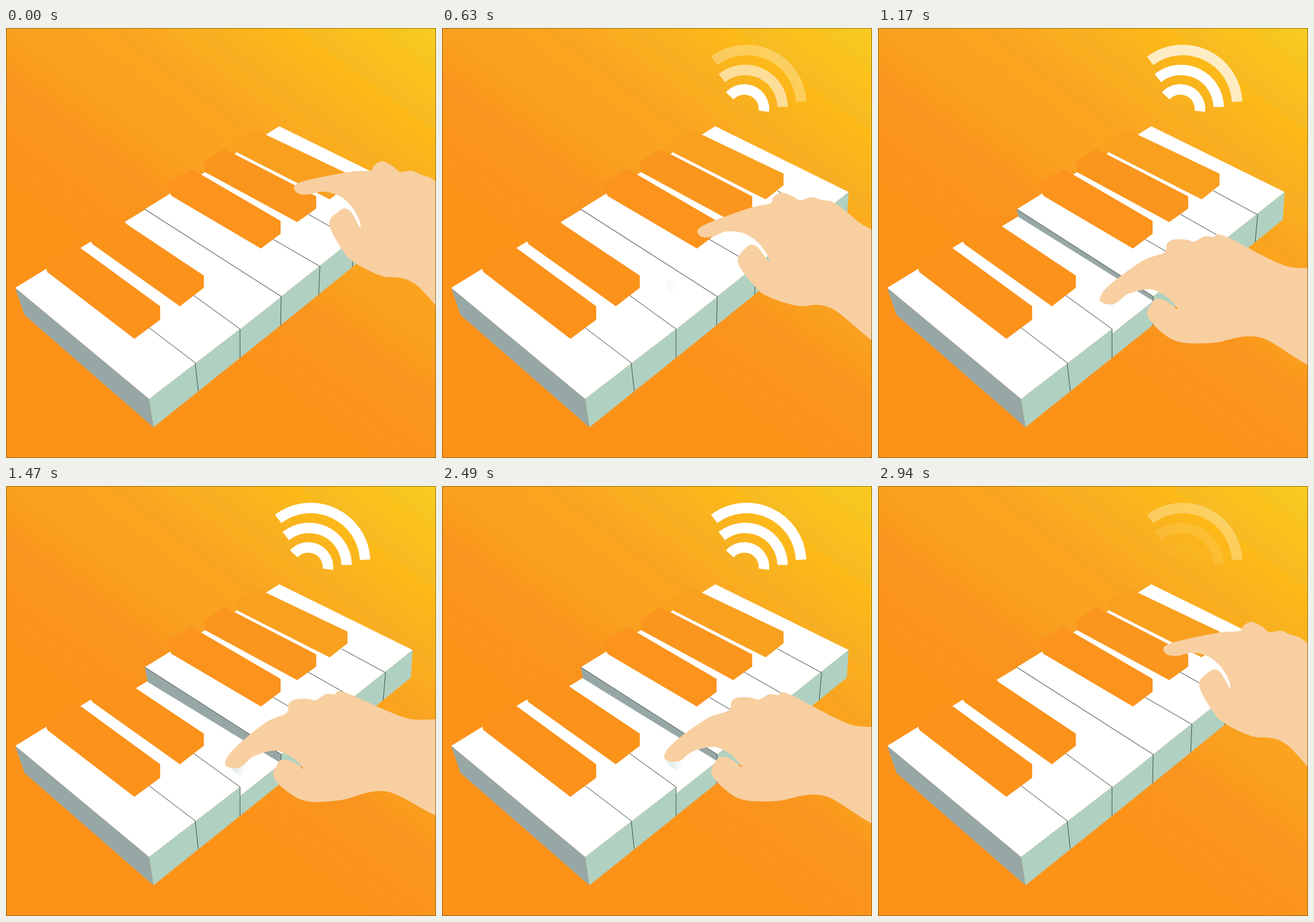
Animation, 700 px wide and 700 px high, one loop 3000 ms. Source, as an HTML page:

```html
<!DOCTYPE html>
<html lang="en">
<head>
<meta charset="utf-8">
<title>Piano key</title>
<style>
html, body { margin: 0; height: 100%; overflow: hidden; background: #fb9a1d; }
svg { display: block; width: 100%; height: 100%; }
.line { fill: none; stroke: #45544f; }
.top { fill: #fff; }
.front { fill: #b0d1c1; }
.side { fill: #97a7a6; }
.wave { fill: none; stroke: #fff; stroke-width: 17; opacity: 0; }
</style>
</head>
<body>
<svg viewBox="0 0 700 700">
  <defs>
    <linearGradient id="sky" gradientUnits="userSpaceOnUse" x1="-120" y1="160" x2="252" y2="-336">
      <stop offset="0" stop-color="#fd9219"/>
      <stop offset=".22" stop-color="#f9951f"/>
      <stop offset=".25" stop-color="#fb9a1d"/>
      <stop offset=".32" stop-color="#f9a020"/>
      <stop offset=".47" stop-color="#fca41e"/>
      <stop offset=".485" stop-color="#f8a321"/>
      <stop offset=".6" stop-color="#fcae1f"/>
      <stop offset=".613" stop-color="#f7ae22"/>
      <stop offset=".775" stop-color="#fdba17"/>
      <stop offset=".79" stop-color="#f6bb22"/>
      <stop offset=".895" stop-color="#fec31a"/>
      <stop offset=".91" stop-color="#f7c420"/>
      <stop offset="1" stop-color="#f9cb1f"/>
    </linearGradient>
    <linearGradient id="shade">
      <stop offset="0" stop-color="#dce8e1"/>
      <stop offset=".9" stop-color="#fff"/>
    </linearGradient>
  </defs>
  <rect width="700" height="700" fill="url(#sky)"/>

  <!-- the moving key and the wall beside it -->
  <path class="side" d="M226 295L448 437V454L231 322Z"/>
  <path class="front" id="keyFront"/>
  <path class="top" id="keyTop"/>
  <path id="shadow" fill="url(#shade)" d="M365 424Q367 413 381 416L396 420L384 444Q368 438 365 424Z"/>

  <path class="top" d="M15 423L190 316L200 350L305 435L381 490L233 604Z"/>
  <path class="top" d="M226 295L445 160L662 267L448 437Z"/>
  <path class="front" d="M233 604L381 490V537L240 650Z"/>
  <path class="front" d="M448 437L662 267L659 312L447 484Z"/>
  <path class="side" d="M15 423L233 604L240 650L30 467Z"/>
  <path class="line" d="M233 488L308 545L313 591M305 435L381 490V537M226 295L448 437L447 484"/>
  <path class="line" d="M435 344L511 388L509 434M492 303L566 345L564 389M546 265L618 304L614 349"/>

  <path fill="#fc921a" d="M64 385L115 350L121 358L251 453V475L209 506L67 397Z"/>
  <path fill="#fb931b" d="M138 347L165 308L180 307L193 317L322 403V423L283 453L141 352Z"/>
  <path fill="#fb931c" d="M263 251L303 230L447 314V335L415 359L269 273Z"/>
  <path fill="#fa961d" d="M323 217L356 197L505 274V294L474 316L323 234Z"/>
  <path fill="#f9a01f" d="M377 183L409 167L556 237V256L527 279L377 203Z"/>

  <path class="wave" d="M468.5 110.5A32 32 0 0 1 524 135.5"/>
  <path class="wave" d="M455.5 81.5A61 61 0 0 1 554.5 128.5"/>
  <path class="wave" d="M443 53.5A88.5 88.5 0 0 1 584.5 120"/>

  <path id="hand" fill="#f8cfa1"/>
  <rect x=".5" y=".5" width="699" height="699" fill="none" stroke="#6e5514" stroke-opacity=".7"/>
</svg>
<script>
const LOOP = 3000, STEP = 60;
const $ = id => document.getElementById(id);
const waves = document.querySelectorAll('.wave');

// Matching hand outlines as x, y pairs
const flat = [730,370, 670,317, 633,289, 612,284, 595,280, 577,285, 563,278, 545,273, 533,282, 528,291,
  495,299, 432,323, 411,336, 417,347, 434,347, 458,338, 485,340, 507,353, 523,372, 528,386,
  511,365, 500,359, 490,364, 477,388, 506,427, 528,443, 575,457, 630,460, 730,522];
const curled = [740,391, 650,376, 550,336, 532,339, 518,339, 502,349, 490,347, 470,348, 458,355, 454,371,
  420,387, 370,430, 356,453, 364,461, 382,459, 402,442, 436,432, 462,441, 477,453, 483,461,
  464,449, 448,447, 441,454, 435,475, 460,500, 492,514, 545,511, 620,496, 730,535];

// Timelines: [ms, value]
const handTrack = [[630, 1], [900, 2], [1140, 2.25], [1470, 2.92], [1740, 3], [2070, 3], [2250, 2.76],
  [2500, 2.1], [2700, 1.32], [2820, .6], [2940, .07], [3000, 0]];
const dropTrack = [[0, .8], [630, 1], [900, 4], [1140, 12], [1470, 24.5], [1620, 27], [2250, 27],
  [2500, 16], [2700, 4.5], [2880, .8]];
const shadowTrack = [[570, 0], [630, .4], [900, 1], [2700, 1], [2880, 0]];
const inner = [[60, 0], [500, 1], [2520, 1], [2700, .45], [2880, .05], [3000, 0]];
const middle = [[240, 0], [630, .6], [870, 1], [2700, 1], [2940, .1], [3000, 0]];
const outer = [[360, 0], [630, .33], [900, .5], [1400, 1], [2820, 1], [2940, .3], [3000, 0]];

const mix = (a, b, u) => a + (b - a) * u;

function at(track, t) {
  const i = track.findIndex(k => k[0] > t);
  if (i === 0) return track[0][1];
  if (i < 0) return track[track.length - 1][1];
  const [t0, a] = track[i - 1], [t1, b] = track[i];
  return mix(a, b, (t - t0) / (t1 - t0));
}

// Turns an outline about (cx, cy), then shifts it
function turn(p, angle, cx, cy, dx = 0, dy = 0) {
  const c = Math.cos(angle), s = Math.sin(angle);
  return p.map((v, i) => i % 2
    ? cy + dy + (p[i - 1] - cx) * s + (v - cy) * c
    : cx + dx + (v - cx) * c - (p[i + 1] - cy) * s);
}

const touching = turn(curled, .105, 525, 515);

// 0 raised, 1 lowering, 2 touching, 3 pressing
function handPose(s) {
  if (s < 1) return turn(flat, .17 * (1 - s), 540, 360, 53 * (1 - s), -58 * (1 - s));
  if (s < 2) return flat.map((v, i) => mix(v, touching[i], s - 1));
  return turn(curled, .105 * (3 - s), 525, 515);
}

// Closed Catmull-Rom curve through flat x, y pairs
function curve(p) {
  const n = p.length;
  const v = i => p[(i + n) % n];
  const out = i => v(i) + (v(i + 2) - v(i - 2)) / 6;
  const into = i => v(i) - (v(i + 2) - v(i - 2)) / 6;
  let d = `M${p[0]} ${p[1]}`;
  for (let i = 0; i < n; i += 2) {
    d += `C${out(i)} ${out(i + 1)} ${into(i + 2)} ${into(i + 3)} ${v(i + 2)} ${v(i + 3)}`;
  }
  return d + 'Z';
}

function draw(t) {
  const s = t < 630 ? (t / 630) ** 2 : at(handTrack, t);
  $('hand').setAttribute('d', curve(handPose(s)));

  const drop = at(dropTrack, t), lip = drop * .62, back = drop * .15;
  const edge = `L448 ${437 + lip}L381 ${490 + lip}`;
  $('keyTop').setAttribute('d', `M${193 + back} ${315 + drop}L${226 + back} ${295 + drop}${edge}V490L305 435Z`);
  $('keyFront').setAttribute('d', `M447 484${edge}V537Z`);
  $('shadow').setAttribute('transform', `translate(0 ${1.5 * (drop - 4.5)})`);
  $('shadow').setAttribute('opacity', at(shadowTrack, t));
  [inner, middle, outer].forEach((track, k) => { waves[k].style.opacity = at(track, t); });
}

const start = performance.now();
function tick() {
  const t = (performance.now() - start) % LOOP;
  draw(Math.floor(t / STEP) * STEP);
  requestAnimationFrame(tick);
}
tick();
</script>
</body>
</html>
```
